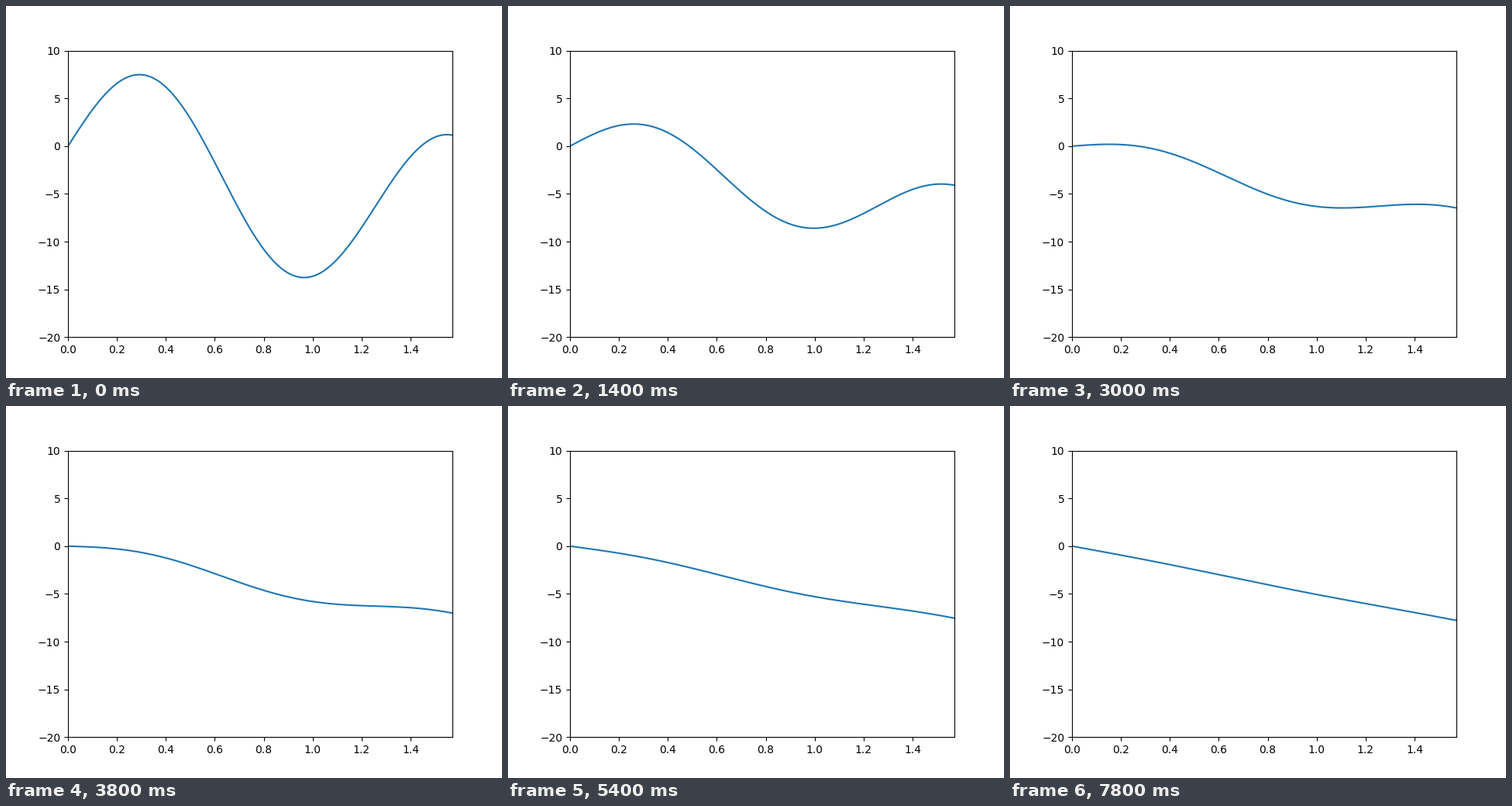
A matplotlib script that plays this animation: 640x480 px, repeating every 8000 ms.

```python
import numpy as np
import matplotlib.pyplot as plt
from matplotlib.animation import FuncAnimation

FRAMES = 40
INTERVAL = 200   # ms
DT = 0.005       # model time per frame
K = 5            # wave number of the decaying mode

x = np.linspace(0, np.pi / 2, 200)


def heat(t):
    """Heat equation: one sine mode fading onto a linear steady state."""
    return 9 * np.exp(-K**2 * t) * np.sin(K * x) - 5 * x


fig, ax = plt.subplots(figsize=(6.4, 4.8), dpi=100)
ax.set_xlim(0, np.pi / 2)
ax.set_ylim(-20, 10)
line, = ax.plot(x, heat(0))


def update(i):
    line.set_ydata(heat(i * DT))
    return line,


anim = FuncAnimation(fig, update, frames=FRAMES, interval=INTERVAL,
                     repeat=True, repeat_delay=0)
plt.show()
```
